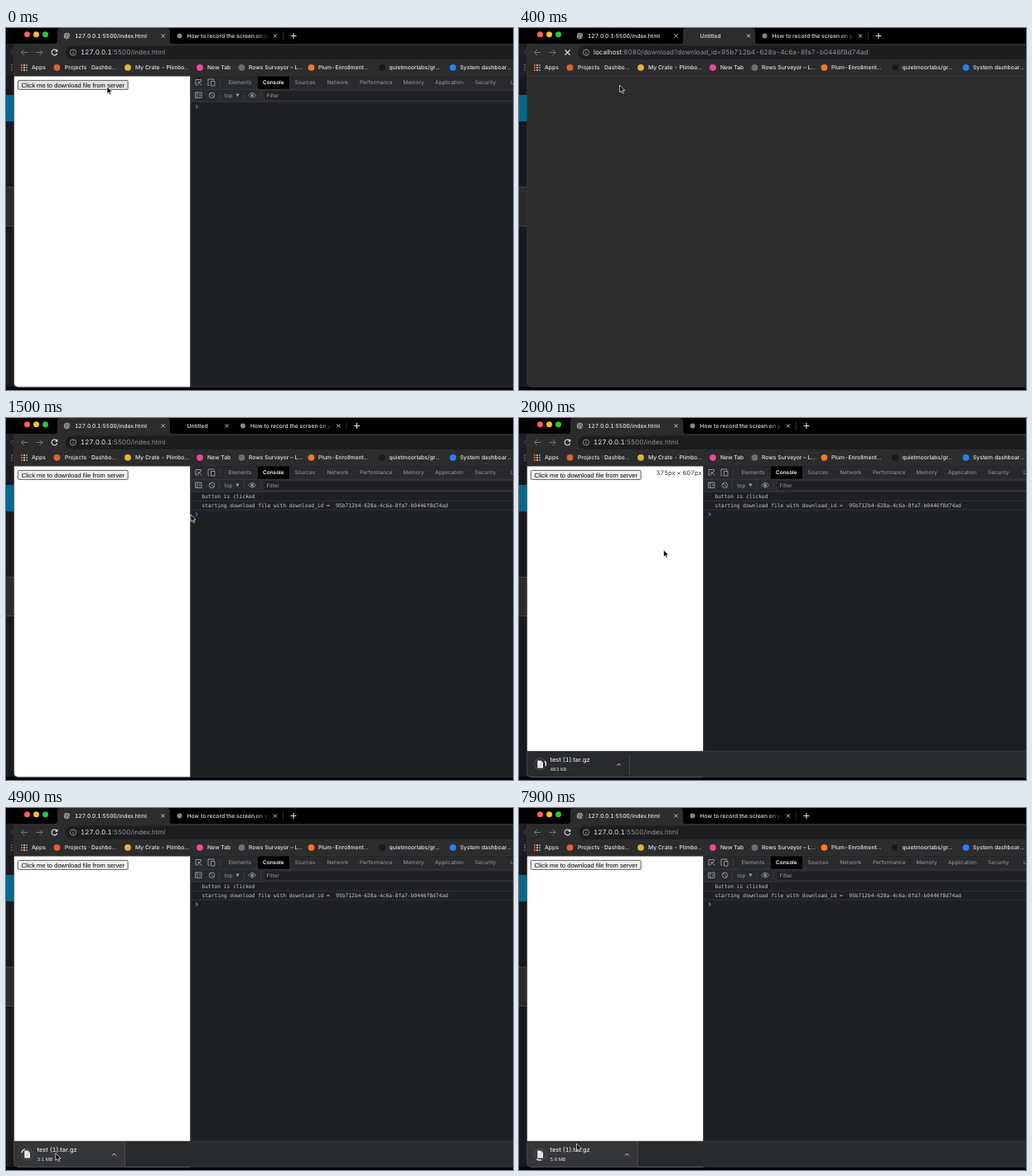
An HTML page for the animation above (8000 ms loop, 612x438 px).

```html
<!DOCTYPE html>
<html lang="en">
<head>
<meta charset="utf-8">
<title>File download</title>
<style>
html, body { margin: 0; width: 612px; height: 438px; overflow: hidden; background: #000; }
svg { display: block; }
text { font: 500 6.75px Inter, sans-serif; font-variant-numeric: tabular-nums; fill: #e4e6e9; white-space: pre; text-rendering: geometricPrecision; }
.url { font-size: 8px; font-weight: 400; fill: #8f9296; }
.url .host { fill: #e8eaed; }
.dev { font-size: 6.45px; font-weight: 400; fill: #9a9da1; }
.log { font: 6.25px "DejaVu Sans Mono", monospace; fill: #c3c6ca; }
.line { fill: none; stroke: #9a9da1; stroke-width: .9; }
.lit { stroke: #e0e2e5; }
.bold { stroke-width: 1.1; }
.rule { fill: none; stroke: #414245; stroke-width: .7; }
</style>
</head>
<body>
<svg width="612" height="438" viewBox="0 0 612 438">
  <defs>
    <clipPath id="win"><rect x="9.5" y="-10" width="640" height="444.5" rx="5"/></clipPath>
    <clipPath id="newClip"><rect id="newBox" x="198" y="0" width="0" height="20"/></clipPath>
    <linearGradient id="fade"><stop offset="0" stop-opacity="0"/><stop offset="1"/></linearGradient>
    <path id="x" d="M-2 -2L2 2M2 -2L-2 2"/>
  </defs>

  <!-- window behind -->
  <rect width="612" height="438" fill="#030303"/>
  <rect y="19" width="12" height="39" fill="#1e1e24"/>
  <rect y="58" width="12" height="376" fill="#18191c"/>
  <rect y="81" width="12" height="32" fill="#04698a"/>
  <rect x="-1" y="192.5" width="14" height="47" fill="#2b2b2c" stroke="#444"/>
  <path class="line" d="M9 26.5L6 29.5L9 32.5" opacity=".5"/>
  <path d="M7 44v8" stroke="#83534a" stroke-width="1.8" stroke-dasharray="1.8 1.2"/>

  <g clip-path="url(#win)">
    <rect x="9" width="603" height="19.5" fill="#000"/>
    <rect x="9" y="19" width="603" height="416" fill="#2c2c2d"/>
    <path id="active" fill="#2c2c2d"/>
    <circle cx="25.5" cy="7.7" r="3.5" fill="#ff5f57"/>
    <circle cx="36.5" cy="7.7" r="3.5" fill="#febc2e"/>
    <circle cx="47.5" cy="7.7" r="3.5" fill="#28c840"/>

    <!-- tabs -->
    <circle cx="73.5" cy="9.5" r="3.7" fill="#9b9ea2"/>
    <path d="M70.6 8.2l2.4 1.3l-.6 2.6M74 6.4l-.4 1.7l2.6 1.1M75 12.4l.4-1.7l1.6-.4" fill="none" stroke="#2c2c2d" stroke-width=".8"/>
    <text x="83" y="12">127.0.0.1:5500/index.html</text>
    <use href="#x" x="189.5" y="9.5" class="line lit"/>
    <g clip-path="url(#newClip)">
      <text x="218.5" y="12">Untitled</text>
      <use id="newX" href="#x" y="9.5" class="line lit"/>
    </g>
    <g id="other">
      <circle cx="209.5" cy="9.5" r="3" fill="#85878a"/>
      <text x="218.5" y="12">How to record the screen on yo</text>
      <rect x="302" y="2" width="16" height="15" fill="url(#fade)"/>
      <rect x="318" y="2" width="12" height="15"/>
      <use href="#x" x="325" y="9.5" class="line lit"/>
      <path class="rule" d="M334.5 4.5V15"/>
      <path class="line lit bold" d="M343.5 9.5h7M347 6v7"/>
    </g>

    <!-- address row -->
    <rect x="71.5" y="21.5" width="560" height="16.5" rx="8.25" fill="#1c1d1f"/>
    <path class="line" d="M26 29.5H18.5M22 26L18.5 29.5L22 33" opacity=".75"/>
    <path class="line" d="M36.5 29.5H44M40.5 26L44 29.5L40.5 33" opacity=".75"/>
    <g id="reload" class="line lit bold">
      <path d="M61.4 27.6A3.4 3.4 0 1 0 61.8 30.5"/>
      <path d="M62.3 25.6V28.7H59.2Z" fill="#e0e2e5" stroke="none"/>
    </g>
    <path id="stop" class="line lit bold" d="M55.5 26.5l6 6M61.5 26.5l-6 6"/>
    <circle class="line" cx="81" cy="29.5" r="3.6"/>
    <path class="line" d="M81 29v2.5M81 27.3v.9"/>
    <text class="url" x="90" y="32.4"><tspan id="host" class="host"></tspan><tspan id="path"></tspan></text>

    <g id="marks"></g>
    <path class="rule" d="M9 58.3H612"/>

    <!-- page and developer tools -->
    <g id="page">
      <rect x="9.5" y="58.5" width="213" height="377" fill="#fff"/>
      <rect id="button" x="14.4" y="63.4" width="132.8" height="11" rx="1.2" stroke="#3c3c3c" stroke-width=".8"/>
      <text x="18.5" y="71.6" style="font:7.6px 'Liberation Sans',Arial,sans-serif;fill:#000">Click me to download file from server</text>
      <text id="size" x="165.5" y="68.5" style="font-size:7.5px;font-weight:400;fill:#333">375px × 607px</text>
      <rect x="222.5" y="58" width="390" height="377" fill="#1f2023"/>
      <rect x="223" y="58.5" width="390" height="30.5" fill="#292a2d"/>
      <rect x="304" y="58.5" width="38" height="15.5" fill="#000"/>
      <path class="rule" d="M222.8 58V435M223 74.2H612M223 89.2H612M258.5 61V71M257.5 77V86M287.5 77V86M307.5 77V86"/>
      <path class="line" d="M235.5 65V62.5H229V69H231.5M232 65.5l4.5 4M232 68.5V65.5H235"/>
      <path class="line" d="M245.5 69.5H244V62H251V63.5M247.5 64.5H252V70H247.5Z"/>
      <path class="line" d="M228.5 78H236V84.5H228.5ZM230.8 78V84.5M232.8 79.8L234.6 81.3L232.8 82.8"/>
      <circle class="line" cx="248.5" cy="81.3" r="3.3"/>
      <path class="line" d="M246.2 79L250.8 83.6"/>
      <text class="dev" x="263.5" y="83.6">top</text>
      <path d="M277.3 79.5H281.7L279.5 83.5Z" fill="#9a9da1"/>
      <path class="line" d="M293 81.3Q297.2 75.5 301.5 81.3Q297.2 87 293 81.3Z"/>
      <circle cx="297.2" cy="81.3" r="1.6" fill="#9a9da1"/>
      <rect x="311.5" y="76" width="310" height="11.5" fill="#1f2023" stroke="#36373a" stroke-width=".6"/>
      <text class="dev" x="314.5" y="83.8">Filter</text>
      <g id="panels"></g>
      <g id="logs">
        <text class="log" x="236.5" y="97.2">button is clicked</text>
        <text class="log" x="236.5" y="108.1">starting download file with download_id =  95b712b4-628a-4c6a-8fa7-b0446f8d74ad</text>
        <path class="rule" d="M223 100.3H612M223 111.1H612" opacity=".7"/>
      </g>
      <path id="prompt" d="M229 93.2L231.3 95.2L229 97.2" fill="none" stroke="#4377e6" stroke-width="1.1"/>
    </g>

    <!-- download shelf -->
    <g id="shelf">
      <rect x="9" y="403" width="603" height="32" fill="#292a2c"/>
      <path class="rule" d="M9 403.3H612"/>
      <rect id="hover" x="10" y="404" height="31" fill="#353638"/>
      <path id="edge" class="rule" style="stroke:#555659"/>
      <circle cx="25.5" cy="419" r="7" fill="none" stroke="#444548" stroke-width="1.3"/>
      <path id="arc" d="M31.84 416.04A7 7 0 0 1 31.84 421.96" fill="none" stroke="#e4e6e9" stroke-width="1.4"/>
      <path d="M22.3 414.5H26.7L29 416.8V423.5H22.3Z" fill="#f1f2f3"/>
      <path d="M26.5 414.5V417H29M23.7 419H27.6M23.7 421H27.6" fill="none" stroke="#9fa1a4" stroke-width=".6"/>
      <text x="37.5" y="416.3" style="font-size:7.4px">test (1).tar.gz</text>
      <text id="count" x="37.5" y="427.3" style="font-size:5.6px;fill:#c9cbce"></text>
      <path id="chevron" class="line lit" d="M-2.2 1.2L0 -1.2L2.2 1.2"/>
    </g>
    <path d="M9.7 19V430Q9.7 434.3 14 434.3H612" fill="none" stroke="#48494b" stroke-width=".6"/>
  </g>
  <path id="cursor" d="M0 0V8.6L2 6.8L3.3 9.8L4.8 9.2L3.5 6.3H6.2Z" fill="#000" stroke="#fff" stroke-width=".7"/>
</svg>
<script>
const LOOP = 8000, STEP = 100;
const OPEN = 300, LOADED = 700, CLOSE = 1500;
const $ = id => document.getElementById(id);
const set = (id, attrs) => {
  for (const k in attrs) $(id).setAttribute(k, attrs[k]);
};
const show = (id, on) => set(id, { visibility: on ? 'visible' : 'hidden' });
const move = (id, x, y) => set(id, { transform: `translate(${x} ${y})` });

// [time, value, ...] rows
const CURSOR = [
  [0, 122, 71], [400, 121.6, 69.2], [800, 222, 110], [1000, 222, 110],
  [1200, 226.8, 113.4], [1400, 226.8, 113.4], [2000, 174.5, 159.5],
  [3000, 80, 417], [3700, 59, 416], [6300, 61, 420], [7600, 69.5, 406]
];
const SHELF = [[1500, 32], [1700, 0]];
const KB = [[1300, 0], [1800, 463], [3300, 1887], [5800, 3994], [7800, 5735]];

const linear = k => k;
const smooth = k => k * k * (3 - 2 * k);
const easeOut = k => 1 - (1 - k) ** 2;
const clamp = k => Math.min(1, Math.max(0, k));

function at(rows, t, ease = linear) {
  if (t <= rows[0][0]) return rows[0].slice(1);
  const i = rows.findIndex(r => r[0] > t);
  if (i < 0) return rows[rows.length - 1].slice(1);
  const a = rows[i - 1], b = rows[i], k = ease((t - a[0]) / (b[0] - a[0]));
  return a.slice(1).map((v, n) => v + (b[n + 1] - v) * k);
}

// a tab opens and closes in 200 ms
function tabWidth(t) {
  const grow = easeOut(clamp((t - OPEN - 20) / 200));
  const shrink = easeOut(clamp((t - CLOSE + 50) / 200));
  return 136 * (grow - shrink);
}

// the byte count refreshes twice a second
const refresh = t => 1800 + Math.floor((t - 1800) / 500) * 500;

const MARKS = [
  [22, 31, 'Apps'],
  [61.5, 71, 'Projects · Dashbo...', '#e5602d'],
  [147, 156, 'My Crate - Plimbo...', '#e5b52e'],
  [234, 243, 'New Tab', '#f0479a'],
  [284.5, 293, 'Rows Surveyor – L...', '#6c6f73'],
  [368.5, 377, 'Plum-Enrollment...', '#ee7a2c'],
  [454, 462.5, 'quietmoorlabs/gr...', '#19191b'],
  [539.5, 548, 'System dashboar...', '#2680f5']
];
const DOTS = ['#e5533d', '#e9b93a', '#4a8df0', '#47a95b'];
$('marks').innerHTML = MARKS.map(([cx, x, name, color]) => {
  let icon = '';
  if (color) icon = `<circle cx="${cx}" cy="47.8" r="3.9" fill="${color}"/>`;
  else for (let i = 0; i < 9; i++) {
    const row = Math.floor(i / 3);
    icon += `<rect x="${cx - 4 + i % 3 * 3}" y="${44 + row * 3}" width="2" height="2" fill="${DOTS[(i + row) % 4]}"/>`;
  }
  return `${icon}<text x="${x}" y="50.2">${name}</text>`;
}).join('');

const PANELS = [
  [268.5, 'Elements'], [310, 'Console'], [348.5, 'Sources'], [387.5, 'Network'],
  [427, 'Performance'], [479.5, 'Memory'], [518, 'Application'], [566, 'Security'], [609, 'Lighthouse']
];
$('panels').innerHTML = PANELS.map(([x, name]) => {
  const on = name === 'Console' ? ' style="fill:#fff;font-weight:600"' : '';
  return `<text class="dev" x="${x}" y="68.2"${on}>${name}</text>`;
}).join('');

function tabShape(l, r) {
  return `M${l - 4} 19.5Q${l} 19.5 ${l} 15.5V4Q${l} 0 ${l + 4} 0H${r - 4}Q${r} 0 ${r} 4V15.5Q${r} 19.5 ${r + 4} 19.5Z`;
}

function sizeText(kb) {
  return kb < 2048 ? Math.round(kb).toLocaleString('en-US') + ' KB' : (kb / 1024).toFixed(1) + ' MB';
}

function render(t) {
  const w = tabWidth(t), [x, y] = at(CURSOR, t, smooth);
  const [kb] = at(KB, refresh(t)), [drop] = at(SHELF, t);
  const blank = t > OPEN && t < CLOSE;
  const loading = blank && t < LOADED;

  set('active', { d: blank ? tabShape(198, 198 + w) : tabShape(62, 198) });
  set('newBox', { width: w });
  set('newX', { x: 190 + w });
  move('other', w, 0);
  show('stop', loading);
  show('reload', !loading);
  $('host').textContent = blank ? 'localhost' : '127.0.0.1';
  $('path').textContent = blank
    ? ':8080/download?download_id=95b712b4-628a-4c6a-8fa7-b0446f8d74ad'
    : ':5500/index.html';

  const logged = t >= 200;
  set('page', { display: blank ? 'none' : 'inline' });
  set('button', { fill: t < 100 ? '#e2e2e2' : t < 200 ? '#f3f3f3' : '#efefef' });
  show('size', t >= 1700 && t < 2700);
  show('logs', logged);
  move('prompt', 0, logged ? 21.3 : 0);

  const right = kb >= 1000 ? 143.5 : 133.5;
  const over = drop === 0 && y > 404 && x < right;
  set('shelf', { display: drop < 32 ? 'inline' : 'none' });
  move('shelf', 0, drop);
  show('hover', over);
  set('hover', { width: right - 10 });
  set('edge', { d: over ? `M${right} 404V434` : `M${right} 408V432` });
  set('arc', { transform: `rotate(${-10 + (t - 2000) * .08} 25.5 419)` });
  $('count').textContent = sizeText(kb);
  move('chevron', right - 13, 419.3);
  move('cursor', x, y);
}

function tick() {
  const t = performance.now() % LOOP;
  render(Math.floor(t / STEP) * STEP);
  requestAnimationFrame(tick);
}
tick();
</script>
</body>
</html>
```
